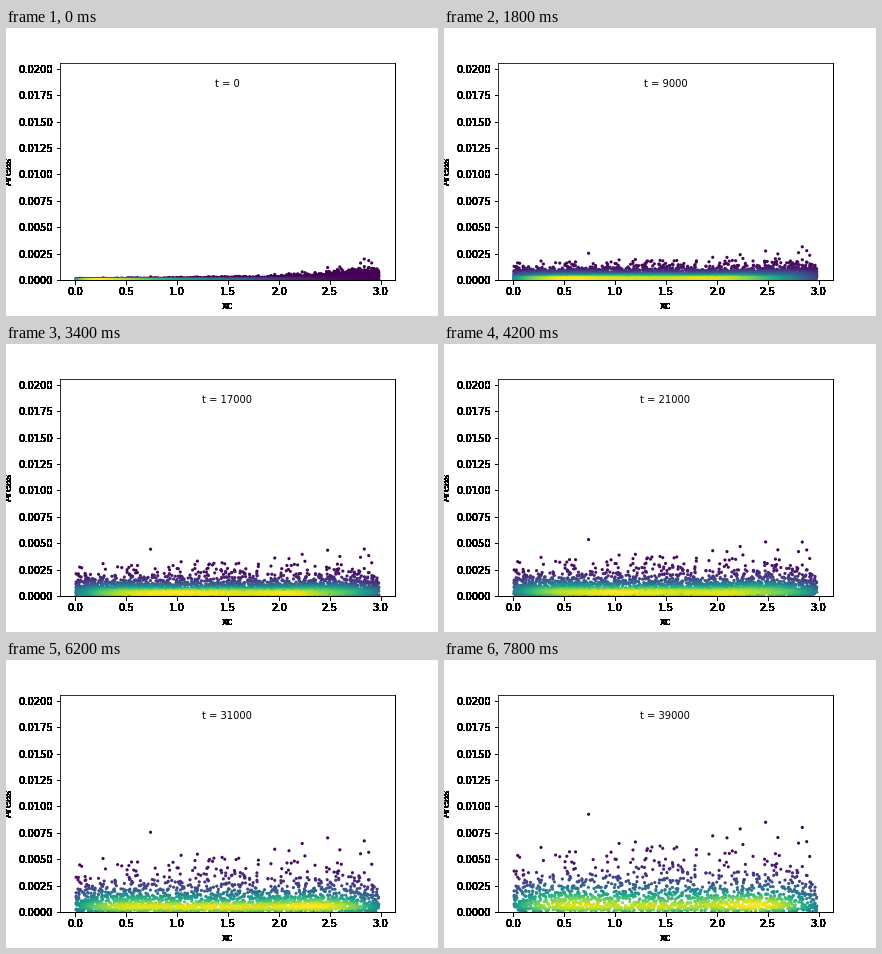
Animation of 432 by 288 pixels, one loop 8 s. Source, as a matplotlib script:

```python
import numpy as np
import matplotlib.pyplot as plt
from matplotlib.animation import FuncAnimation

FRAMES, INTERVAL = 40, 200
XMAX, YTOP = 2.985, 0.0206
GROWTH = 3.9e-5      # growth of the typical area per 1000 time units
BLEND = 1.4          # how quickly the starting sizes are forgotten
SHAPE = 1.15         # Weibull shape of the area distribution
FINAL_COUNT = 1700   # cells left at the end
OVERPRINT = 60       # the axes are printed this often, which thickens labels

# x of the largest cells, biggest first
GIANT_X = np.array([0.74, 2.48, 2.23, 2.84, 1.96, 2.10, 2.60, 1.20, 1.04])


def start_area(x):
    return 2.5e-5 * np.exp(0.45 * x) + 3.6e-4 * (x / 3) ** 7


def typical_area(start, t):
    return (start ** BLEND + (GROWTH * t) ** BLEND) ** (1 / BLEND)


# Cells are spread inversely to their size; a low rank means a big cell.
rng = np.random.default_rng(7)
grid = np.linspace(0.008, XMAX, 600)
cdf = np.cumsum(1 / start_area(grid))
final_share = np.sum(1 / typical_area(start_area(grid), FRAMES - 1)) / cdf[-1]
count = int(FINAL_COUNT / final_share)
cell_x = np.append(GIANT_X, np.interp(rng.random(count), cdf / cdf[-1], grid))
cell_start = start_area(cell_x)

giants = len(GIANT_X)
survival = cell_start / typical_area(cell_start, FRAMES - 1)
cell_rank = rng.uniform(survival * giants / FINAL_COUNT, 1)
cell_rank[:giants] = survival[:giants] * (np.arange(giants) + 0.6) / FINAL_COUNT


def cells(t):
    """Positions and areas of the cells that survive at t (in thousands)."""
    scale = typical_area(cell_start, t)
    u = cell_rank * scale / cell_start
    alive = u < 1
    area = scale[alive] * (-np.log(u[alive])) ** (1 / SHAPE)
    return cell_x[alive], area


def bin_index(v, bins):
    pos = (v - v.min()) / np.ptp(v) * bins
    return np.minimum(pos.astype(int), bins - 1)


def kernel(v, bins, factor):
    width = v.std() * factor / np.ptp(v) * bins
    i = np.arange(bins)
    return np.exp(-0.5 * ((i[:, None] - i) / width) ** 2)


def density(x, y, bins=300):
    """Gaussian kernel density at each point, computed on a grid."""
    ix, iy = bin_index(x, bins), bin_index(y, bins)
    hist = np.bincount(ix * bins + iy, minlength=bins * bins)
    factor = len(x) ** (-1 / 6)
    smooth = (kernel(x, bins, factor) @ hist.reshape(bins, bins)
              @ kernel(y, bins, factor))
    return smooth[ix, iy]


fig = plt.figure(figsize=(6, 4), dpi=72, facecolor="white")
ax = fig.add_axes([0.125, 0.125, 0.775, 0.755])
ax.set(xlim=(-0.15, 3.14), ylim=(0, YTOP), xlabel="xc", ylabel="Areas")
ax.set_xticks(np.arange(7) * 0.5)
ax.set_yticks(np.arange(9) * 0.0025)

# Overprinting multiplies the soft edges of the text until they are black.
fig.canvas.draw()
page = np.asarray(fig.canvas.buffer_rgba())[..., :3] / 255
fig.figimage(page ** OVERPRINT, zorder=-1)

dots = ax.scatter([], [], c=[], s=10, linewidths=0, cmap="viridis")
label = ax.text(0.5, 0.9, "", transform=ax.transAxes, ha="center", va="center")


def update(i):
    x, y = cells(i)
    z = density(x, y)
    order = z.argsort()
    dots.set_offsets(np.column_stack([x, y])[order])
    dots.set_array(z[order])
    dots.set_clim(z.min(), z.max())
    label.set_text(f"t = {i * 1000}")
    return dots, label


anim = FuncAnimation(fig, update, frames=FRAMES, interval=INTERVAL,
                     init_func=lambda: update(0), repeat=True, repeat_delay=0)
plt.show()
```
